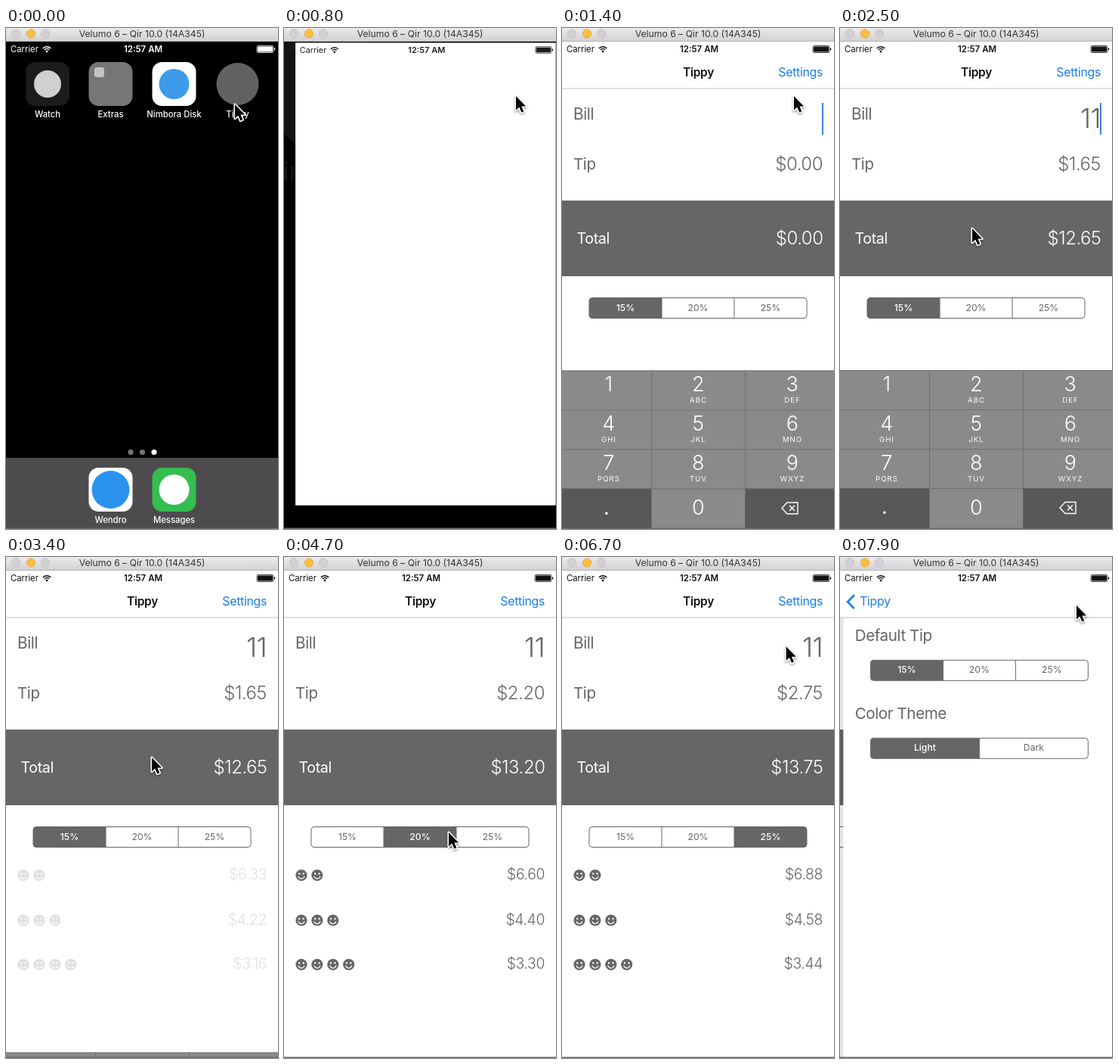
An HTML page with a canvas that plays this animation: 360 px wide and 662 px high, repeating every 8 s.

```html
<!DOCTYPE html>
<html lang="en">
<head>
<meta charset="utf-8">
<title>Tip calculator</title>
<style>
html, body { margin: 0; width: 100%; height: 100%; overflow: hidden; background: #000; }
canvas { display: block; width: 360px; height: 662px; }
</style>
</head>
<body>
<canvas id="stage"></canvas>
<script>
const W = 360, H = 662, TOP = 18, BOTTOM = 661, LOOP = 8000;
const GREY = '#676567', BLUE = '#1a7de8';
const canvas = document.getElementById('stage');
const dpr = window.devicePixelRatio || 1;
canvas.width = W * dpr;
canvas.height = H * dpr;
const c = canvas.getContext('2d');

// Times of the events, in ms
const LAUNCH = 452, READY = 950, HIDE_KEYS = 3000, SHOW_ROWS = 3200, PUSH = 7419;
const CURSOR = [
  [0, 303, 101], [300, 307, 90], [1950, 307, 90], [2500, 175, 265], [2750, 176, 265],
  [3000, 193, 265], [3500, 193, 265], [4000, 190, 366], [4350, 190, 366], [4700, 218, 364],
  [5150, 274, 366], [6100, 276, 366], [6850, 299, 90], [7200, 313, 64], [8000, 313, 64]
];

const clamp = v => Math.max(0, Math.min(1, v));
const lerp = (a, b, p) => a + (b - a) * p;
const smooth = u => (u = clamp(u), u * u * (3 - 2 * u));
const spring = (ms, w = 13.3) => {
  const x = Math.max(0, ms) / 1000 * w;
  return 1 - (1 + x) * Math.exp(-x);
};
const money = v => '$' + (v + 1e-9).toFixed(2);

function rect(x, y, w, h, color) {
  c.fillStyle = color;
  c.fillRect(x, y, w, h);
}

function round(x, y, w, h, r, color) {
  c.beginPath();
  c.roundRect(x, y, w, h, r);
  c.fillStyle = color;
  c.fill();
}

function disc(x, y, r, color) {
  c.beginPath();
  c.arc(x, y, r, 0, 7);
  c.fillStyle = color;
  c.fill();
}

function stroke(color, width) {
  c.strokeStyle = color;
  c.lineWidth = width;
  c.stroke();
}

function path(...points) {
  c.beginPath();
  points.forEach(([x, y]) => c.lineTo(x, y));
}

function text(s, x, y, size, color, align = 'left', weight = 400, gap = size > 14 ? -.02 * size : 0) {
  c.font = `${weight} ${size}px Inter, Roboto, sans-serif`;
  c.letterSpacing = gap + 'px';
  c.textAlign = align;
  c.textBaseline = 'middle';
  c.fillStyle = color;
  c.fillText(s, x, y);
}

// Draws with its own opacity and transform
function layer(alpha, draw) {
  if (alpha <= 0) return;
  c.save();
  c.globalAlpha *= Math.min(1, alpha);
  draw();
  c.restore();
}

function titleBar() {
  const g = c.createLinearGradient(0, 0, 0, TOP);
  g.addColorStop(0, '#ebe9eb');
  g.addColorStop(1, '#d2d0d2');
  rect(0, 0, W, TOP, g);
  rect(0, TOP - 1, W, 1, '#b5b3b5');
  [[13, '#d3d0d3', '#bfbcbf'], [33, '#fdbe3f', '#e0a233'], [52, '#d3d0d3', '#bfbcbf']].forEach(([x, fill, edge]) => {
    disc(x, 7.5, 5.6, fill);
    stroke(edge, .8);
  });
  text('Velumo 6 – Qir 10.0 (14A345)', 180, 8.5, 12.2, '#333', 'center');
}

function statusBar(color) {
  text('Carrier', 6, 28.5, 11.3, color);
  disc(54, 31, 1.4, color);
  [4, 6.8].forEach(r => {
    c.beginPath();
    c.arc(54, 31.5, r, -Math.PI * .77, -Math.PI * .23);
    stroke(color, 1.6);
  });
  text('12:57 AM', 181.5, 28.5, 11.5, color, 'center', 600);
  c.beginPath();
  c.roundRect(332, 23.5, 22, 9, 2);
  stroke(color, .8);
  round(333, 24.5, 20, 7, 1, color);
  round(354.8, 26.5, 1.4, 3, .7, color);
}

function tile(x, y, color, name, mark, r) {
  if (color) round(x - 29, y, 58, 58, 13, color);
  if (mark) disc(x, y + 29, r, mark);
  text(name, x, y + 69.8, 11.3, '#fff', 'center', 500);
}

function home(pressed) {
  tile(55, 45, '#1c1b1d', 'Watch', '#d0d0d2', 18);
  tile(138.5, 45, '#777577', 'Extras');
  round(117, 52, 13, 13, 3, '#c4c4c4');
  tile(222.5, 45, '#fff', 'Nimbora Disk', '#3d9bea', 20);
  tile(306.5, 45, null, 'Tippy', pressed ? '#333' : '#626062', 28);
  [165, 180.5, 196].forEach((x, i) => disc(x, 560.5, 3.6, i == 2 ? '#fff' : '#767476'));
  rect(0, 568, W, BOTTOM - 568, '#4e4b4f');
  tile(138.5, 581, '#fff', 'Wendro', '#2a93ee', 25);
  tile(222.5, 581, '#35bd50', 'Messages', '#fff', 20);
}

function launch(t) {
  const p = spring(t - LAUNCH), s = 1 + 2.1 * p;
  rect(0, TOP, W, BOTTOM - TOP, '#000');
  layer(1 - .98 * p, () => {
    statusBar('#fff');
    c.translate(294, 76);
    c.scale(s, s);
    c.translate(-294, -76);
    home(t > 250);
  });
  layer(p * 4, () => {
    const x = lerp(278, 0, p), y = lerp(45, TOP, p);
    const w = lerp(336, W + 1, p) - x, h = lerp(103, BOTTOM, p) - y;
    round(x, y, w, h, 13 * (1 - p), '#fff');
    c.translate(x, y);
    c.scale(w / W, h / (BOTTOM - TOP));
    c.translate(0, -TOP);
    c.globalAlpha *= p;
    statusBar('#111');
  });
}

function segments(x, y, labels, selected) {
  const w = 288, h = 27, step = w / labels.length;
  c.save();
  c.beginPath();
  c.roundRect(x, y, w, h, 4);
  c.clip();
  rect(x + selected * step, y, step, h, GREY);
  c.restore();
  c.beginPath();
  c.roundRect(x, y, w, h, 4);
  labels.forEach((_, i) => {
    if (!i) return;
    c.moveTo(x + i * step, y);
    c.lineTo(x + i * step, y + h);
  });
  stroke(GREY, 1);
  labels.forEach((s, i) =>
    text(s, x + (i + .5) * step, y + 13.5, 12.2, i == selected ? '#fff' : GREY, 'center', i == selected ? 500 : 400));
}

function smiley(x, y) {
  disc(x, y, 7.6, GREY);
  disc(x - 2.7, y - 2, 1.2, '#fff');
  disc(x + 2.7, y - 2, 1.2, '#fff');
  c.beginPath();
  c.arc(x, y + .4, 4.2, .25, Math.PI - .25);
  stroke('#fff', 1.4);
}

function keyboard(top) {
  const letters = ['', 'ABC', 'DEF', 'GHI', 'JKL', 'MNO', 'PQRS', 'TUV', 'WXYZ'];
  const centers = [61.5, 180, 304.5];
  layer(1, () => {
    c.translate(0, top);
    rect(0, 0, W, 209, '#8b898b');
    rect(0, 156, 118, 53, '#59575a');
    rect(242, 156, 118, 53, '#59575a');
    [0, 52, 104, 156].forEach(y => rect(0, y, W, .8, '#6b696b'));
    [118, 242].forEach(x => rect(x, 0, .8, 209, '#6b696b'));
    letters.forEach((s, i) => {
      const x = centers[i % 3], y = Math.floor(i / 3) * 52;
      text(i + 1, x, y + 19.5, 27, '#fff', 'center', 300);
      text(s, x + .5, y + 40, 9.6, '#fff', 'center', 400, 1);
    });
    text('.', 58.5, 182, 27, '#fff', 'center');
    text('0', 180, 182.5, 27, '#fff', 'center', 300);
    c.lineJoin = 'round';
    path([291, 182], [298, 174.5], [312, 174.5], [312, 189.5], [298, 189.5]);
    c.closePath();
    stroke('#fff', 1.4);
    path([301, 178.5], [308, 185.5]);
    stroke('#fff', 1.4);
    path([308, 178.5], [301, 185.5]);
    stroke('#fff', 1.4);
  });
}

function splitRows(total, shown) {
  if (!shown) return;
  [420.5, 480, 538.5].forEach((y, i) => {
    for (let k = 0; k < i + 2; k++) smiley(23 + k * 20.9, y);
    text(money(total / (i + 2)), 345, y, 19.4, GREY, 'right', 350);
  });
  // A white veil fades the rows as a whole, faces included
  rect(0, 400, W, 160, `rgba(255,255,255,${1 - shown})`);
}

function calculator(t) {
  const bill = t < 1600 ? 0 : t < 1950 ? 1 : 11;
  const choice = t < 4200 ? 0 : t < 5350 ? 1 : 2;
  const tip = bill * [.15, .2, .25][choice], total = bill + tip;
  rect(0, TOP, W, BOTTOM - TOP, '#fff');
  text('Bill', 15, 114.5, 20.8, GREY);
  if (bill) text(bill, 345, 121, 36, GREY, 'right', 300);
  if (t < HIDE_KEYS) rect(344, 99, 2, 42, '#3f7fe0');
  text('Tip', 15, 181, 20.5, GREY);
  text(money(tip), 345, 180.5, 24, GREY, 'right', 350);
  rect(0, 228, W, 100, GREY);
  text('Total', 19.5, 279, 19.7, '#fff');
  text(money(total), 345.5, 278.5, 24, '#fff', 'right', 350);
  segments(36, 356.5, ['15%', '20%', '25%'], choice);
  splitRows(total, smooth((t - SHOW_ROWS) / 700));
  const shown = spring(t - READY, 18) - spring(t - HIDE_KEYS);
  if (shown > .001) keyboard(lerp(BOTTOM, 452, shown));
}

function settings() {
  rect(0, 80, W, BOTTOM - 80, '#fff');
  text('Default Tip', 15.3, 105, 20.6, GREY);
  segments(36, 136.3, ['15%', '20%', '25%'], 0);
  text('Color Theme', 15.3, 208, 20.6, GREY);
  segments(36, 239.3, ['Light', 'Dark'], 0);
}

function navBar(t, p) {
  rect(0, TOP, W, 62, '#fff');
  rect(0, 79.5, W, 1, '#c3c2c3');
  statusBar('#111');
  layer(1 - p * 1.3, () => {
    text('Tippy', lerp(180.5, 46, p), 59.3, 15.5, '#111', 'center', 600);
    layer(t > 7250 ? .3 : 1, () => text('Settings', 345, 59.3, 15.9, BLUE, 'right'));
  });
  layer(p, () => {
    text('Tippy', lerp(160, 24.5, p), 59.5, 15.9, BLUE);
    path([18.8, 50.3], [10.2, 59.2], [18.8, 68.1]);
    stroke(BLUE, 2.8);
  });
}

function app(t) {
  const p = spring(t - PUSH);
  layer(1, () => {
    c.translate(-108 * p, 0);
    calculator(t);
  });
  if (p > 0) {
    // Fill what the sliding page leaves free, then dim it
    layer(1, () => {
      rect(W - 108 * p, 80, 108 * p, BOTTOM - 80, '#fff');
      rect(0, 80, W, BOTTOM - 80, `rgba(0,0,0,${.1 * p})`);
      c.translate(W * (1 - p), 0);
      settings();
    });
  }
  navBar(t, p);
}

function cursor(t) {
  const i = CURSOR.findIndex(k => k[0] > t);
  const [t0, x0, y0] = CURSOR[i - 1], [t1, x1, y1] = CURSOR[i];
  const u = smooth((t - t0) / (t1 - t0));
  layer(1, () => {
    c.translate(lerp(x0, x1, u), lerp(y0, y1, u));
    c.lineJoin = 'round';
    path([0, 0], [0, 18.5], [4.3, 14.6], [7.3, 21.5], [10.3, 20.2], [7.4, 13.5], [13.2, 13.5]);
    c.closePath();
    c.shadowColor = 'rgba(0,0,0,.4)';
    c.shadowBlur = 3 * dpr;
    c.shadowOffsetY = 1.5 * dpr;
    stroke('#fff', 3.2);
    c.shadowColor = 'transparent';
    c.fillStyle = '#000';
    c.fill();
  });
}

function draw(t) {
  c.setTransform(dpr, 0, 0, dpr, 0, 0);
  rect(0, 0, W, H, '#000');
  c.save();
  c.beginPath();
  c.rect(0, TOP, W, BOTTOM - TOP);
  c.clip();
  if (t < READY + 200) launch(t);
  layer((t - READY) / 200, () => app(t));
  c.restore();
  rect(0, BOTTOM - .5, W, 1.5, '#6e6c6e');
  titleBar();
  cursor(t);
}

const start = performance.now();
function tick() {
  draw((performance.now() - start) % LOOP);
  requestAnimationFrame(tick);
}
tick();
</script>
</body>
</html>
```
